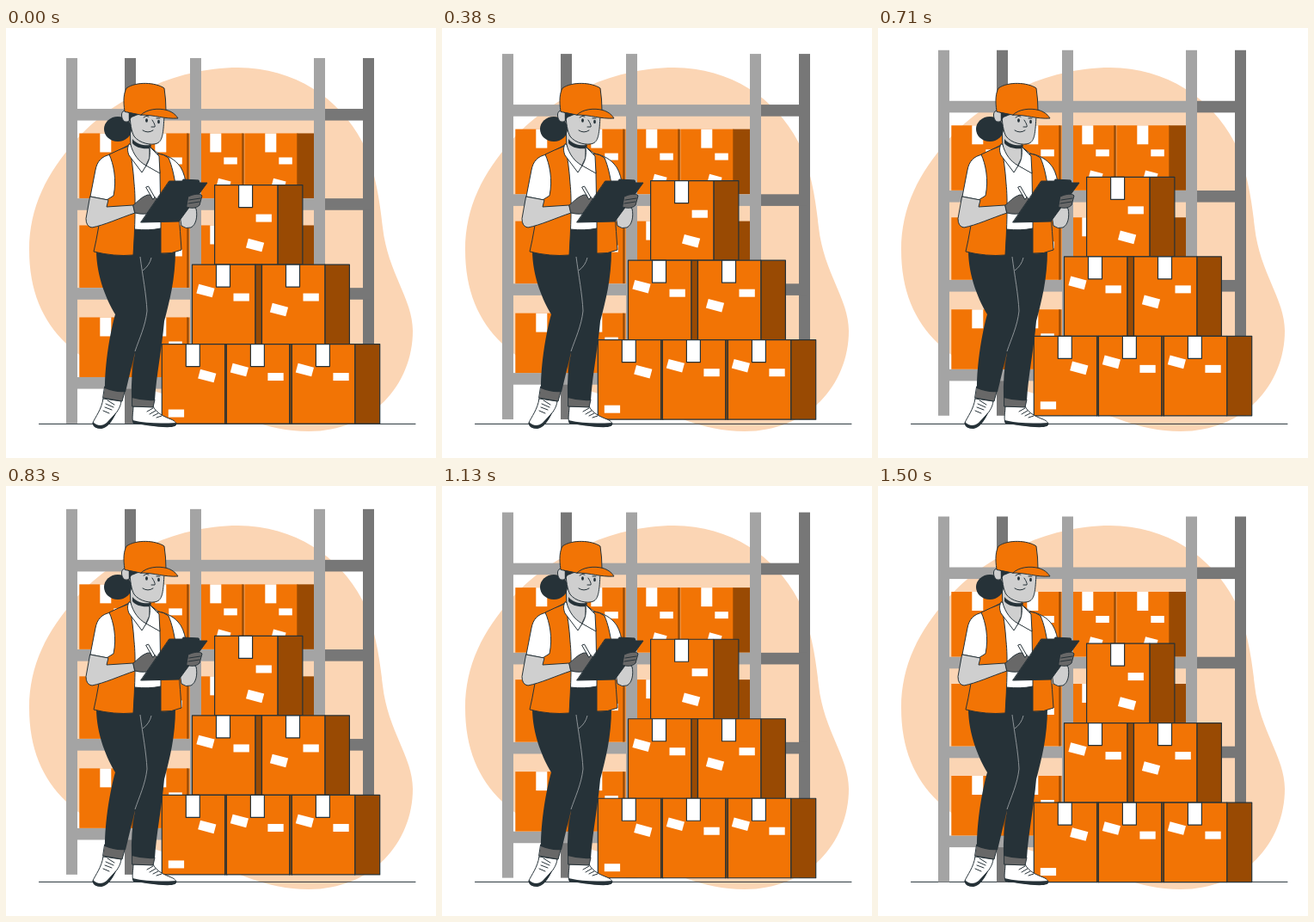
Write an HTML page that moves like this. It is 500x500 px and loops after 1540 ms.

```html
<!DOCTYPE html>
<html lang="en">
<head>
<meta charset="utf-8">
<title>Warehouse check</title>
<style>
  html, body { margin: 0; width: 100%; height: 100%; overflow: hidden; background: #fff; }
  svg { display: block; width: 100vw; height: 100vh; }
  .orange { fill: #f27405; }
  .brown { fill: #994a03; }
  .white { fill: #fff; }
  .dark { fill: #263238; }
  .skin { fill: #cfcfcf; }
  .glove { fill: #686868; }
  .front { fill: #a4a4a4; }
  .back { fill: #777; }
  .line { fill: none; }
  .ink { stroke: #263238; stroke-width: 1; stroke-linejoin: round; stroke-linecap: round; }
  #stock .ink { stroke-width: 1.2; }
</style>
</head>
<body>
<svg viewBox="0 0 500 500">
  <path fill="#fbd5b4" d="M27 258C27 208 48 168 81 131C122 84 195 46 270 46C335 46 388 82 414 132C430 165 435 205 438 232C444 285 473 315 473 352C473 415 425 469 352 469C300 469 270 448 225 436C170 424 110 405 70 367C42 340 27 305 27 258Z"/>
  <path class="ink" d="M38.5 460.4H476"/>

  <g id="stock"></g>

  <g id="worker">
    <!-- shoes and cuffs -->
    <path class="white ink" d="M113 431L134 434C133 441 130 445 127 449C122 458 117 464 111 465C105 465.500 101 463 101 459C104 452 111 444 113 431Z"/>
    <path class="dark" d="M101 458C106 463 112 463 117 459L128 447C124 457 118 465 111 466C104 466 100 463 101 458Z"/>
    <path class="line ink" d="M118 433L126 438M116 437L125 441M115 441L123 444M113 445L120 448"/>
    <path class="white ink" d="M148 440L171 440C175 448 184 452 192 455C197 457 199 460 197 462C180 464 164 461 148 459C146 453 148 447 148 440Z"/>
    <path class="dark" d="M147 456C163 460 180 460 198 459C199 462 197 463 193 464C177 465 161 461 148 460Z"/>
    <path class="line ink" d="M164 446L171 442M167 449L174 445M171 451L177 448M175 453L181 451"/>
    <path class="glove ink" d="M115 417L138 423L135 434L113 430Z"/>
    <path class="glove ink" d="M147 429L173 432L171 441L147 440Z"/>

    <!-- trousers -->
    <path class="dark" d="M105 258C105 290 118 318 127 333C121 354 115 390 115 419Q126 424 139 423L150 377Q145 405 146 430Q160 434 173 433C175 402 181 375 184 341C190 318 197 292 197 258L181 230H149Z"/>
    <path d="M156 266C159 289 163 309 164 329C162 347 155 361 150 376M169 267Q167 276 159 282" fill="none" stroke="#9aa0a3" stroke-width=".9"/>

    <!-- shirt, neck and vest -->
    <path class="white ink" d="M143 136L122 147C111 149 106 155 104 165L98 196L123 201L149 234Q166 236 180 233L192 214L209 206C212 189 209 167 200 158C194 151 184 147 177 146L167 138Z"/>
    <path class="skin ink" d="M144 112L145 139C149 153 155 160 161 163L167 151V132Z"/>
    <path class="dark" d="M147 129C153 136 161 137 169 136L168 140C158 141 151 139 147 134Z"/>
    <path class="skin ink" d="M202 198L214 205L221 210C223 219 221 229 215 232Q209 234 204 230L200 206Z"/>
    <path class="orange ink" d="M143 137Q130 142 120 147C125 158 129 176 125 195L112 203C109 224 106 243 102 260Q126 266 148 264C150 232 151 199 149 181C148 165 146 150 143 137Z"/>
    <path class="orange ink" d="M177 146Q184 147 189 151C197 170 200 197 204 258Q193 263 180 262V225L179 169Z"/>
    <path class="white ink" d="M143 135C141 139 141 143 143 148L158 168L163 160C154 155 148 147 145 136ZM167 138L178 149L179 169L163 160C167 154 168 147 167 138Z"/>

    <!-- clipboard and arms -->
    <path class="skin ink" d="M98 196L119 200L117 208L148 206L150 215C132 221 115 229 100 232Q93 231 93 222Z"/>
    <path class="glove ink" d="M148 206C153 202 158 196 165 194C171 194 177 198 177 204L171 214Q161 218 150 215Z"/>
    <path class="white ink" d="M163 185L165.500 184L173 197L171 199Z"/>
    <path class="dark ink" d="M190 178L205 178L206 176L224 177L225 180L234 180L201 225L157 226Z"/>
    <path class="glove ink" d="M212 196C218 193 226 192 228 195L225 206C221 210 215 210 210 208Z"/>
    <path class="line ink" d="M213 200L226 198M212 204L225 202"/>

    <!-- head -->
    <ellipse class="dark" cx="130" cy="117.500" rx="16" ry="14.500"/>
    <path class="skin ink" d="M144 98C144 110 146 121 149 126C155 134 169 137 176 134C182 131 183 123 184 101Z"/>
    <path class="dark" d="M139 95L160 99C153 101 151 102 146 104L142 110Z"/>
    <path class="skin ink" d="M143 99C139 94 134 96 134.500 102C135 108 139 111 143 108Z"/>
    <path class="orange ink" d="M138 97C136 84 137 76 140 70C151 62 174 63 184 70Q186 83 186 96L157 101Z"/>
    <path class="orange ink" d="M157 101C164 94 177 93 187 95.500C195 98 198 102 200 105C184 106 173 101 157 101Z"/>
    <ellipse class="dark" cx="163.500" cy="107.500" rx="1.400" ry="2.200"/>
    <ellipse class="dark" cx="177.500" cy="109" rx="1.400" ry="2.200"/>
    <path class="line ink" d="M160 104Q163 101 166 103M175 105L179 105M170 107Q174 113 173 115L169 115M159 119Q165 123 171 119"/>
  </g>
</svg>
<script>
const stock = document.getElementById("stock");

function rect(cls, x, y, w, h, turn = 0) {
  const r = document.createElementNS("http://www.w3.org/2000/svg", "rect");
  const attrs = { class: cls, x, y, width: w, height: h };
  if (turn) attrs.transform = `rotate(${turn} ${x + w / 2} ${y + h / 2})`;
  for (const key in attrs) r.setAttribute(key, attrs[key]);
  stock.append(r);
}

// Shelving: rear posts, beams, stored boxes, front posts
const beams = [94, 198.2, 302.2, 406];
for (const x of [138, 415]) rect("back", x, 35, 13, 425);
for (const y of beams) {
  rect("front", 76, y, 288, 13.6);
  rect("back", 364, y, 61, 13.6);
}
[[122.5, 75.5], [229.5, 72.5], [336.5, 69.5]].forEach(([y, h], row) => {
  for (let i = 0; i < 4; i++) {
    const x = 85.3 + 64 * i;
    rect("orange", x, y, 62, h);
    rect("brown", x + 61, y, i < 3 ? 2.5 : 20, h);
    rect("white", x + 24, y, 13, 22);
    rect("white", x + 40, y + 28, 15.5, 8);
    if (row === 0) rect("white", x + 32.5, y + 54, 15, 8, 15);
  }
});
for (const x of [70, 214, 358]) rect("front", x, 35, 13, 425);

// Stack: x, y, side width, straight label x/y, tilted label x/y (from box corner)
const boxes = [
  [242.6, 182.6, 29, 48, 34, 37.5, 64.5],
  [216.5, 275.1, 7.6, 48, 33.5, 6, 25],
  [297.5, 275.1, 28.6, 48, 33.5, 10.5, 47],
  [181.3, 367.6, 2.3, 7.5, 76, 43, 31.5],
  [256.4, 367.6, 2.8, 48, 33.5, 5.5, 24.5],
  [332.4, 367.6, 29, 48, 33.5, 5.5, 24.5],
];
for (const [x, y, side, lx, ly, tx, ty] of boxes) {
  rect("brown ink", x + 73.3, y, side, 92.5);
  rect("orange ink", x, y, 73.3, 92.5);
  rect("white ink", x + 28, y, 16, 26);
  rect("white", x + lx, y + ly, 18.3, 9);
  rect("white", x + tx, y + ty, 19, 11, 15);
}

// Linear up-and-down float, 10 px, in 37 steps per loop
const LOOP = 1540, STEPS = 37, RISE = 10;

function draw(now) {
  const step = Math.floor(((now + 3) % LOOP) / LOOP * STEPS);
  const phase = ((step + 1) % STEPS) / STEPS;
  const lift = RISE * (1 - Math.abs(1 - 2 * phase));
  stock.setAttribute("transform", `translate(0 ${(0.5 - lift).toFixed(3)})`);
}

const start = performance.now();
function tick() {
  draw(performance.now() - start);
  requestAnimationFrame(tick);
}
tick();
</script>
</body>
</html>
```
